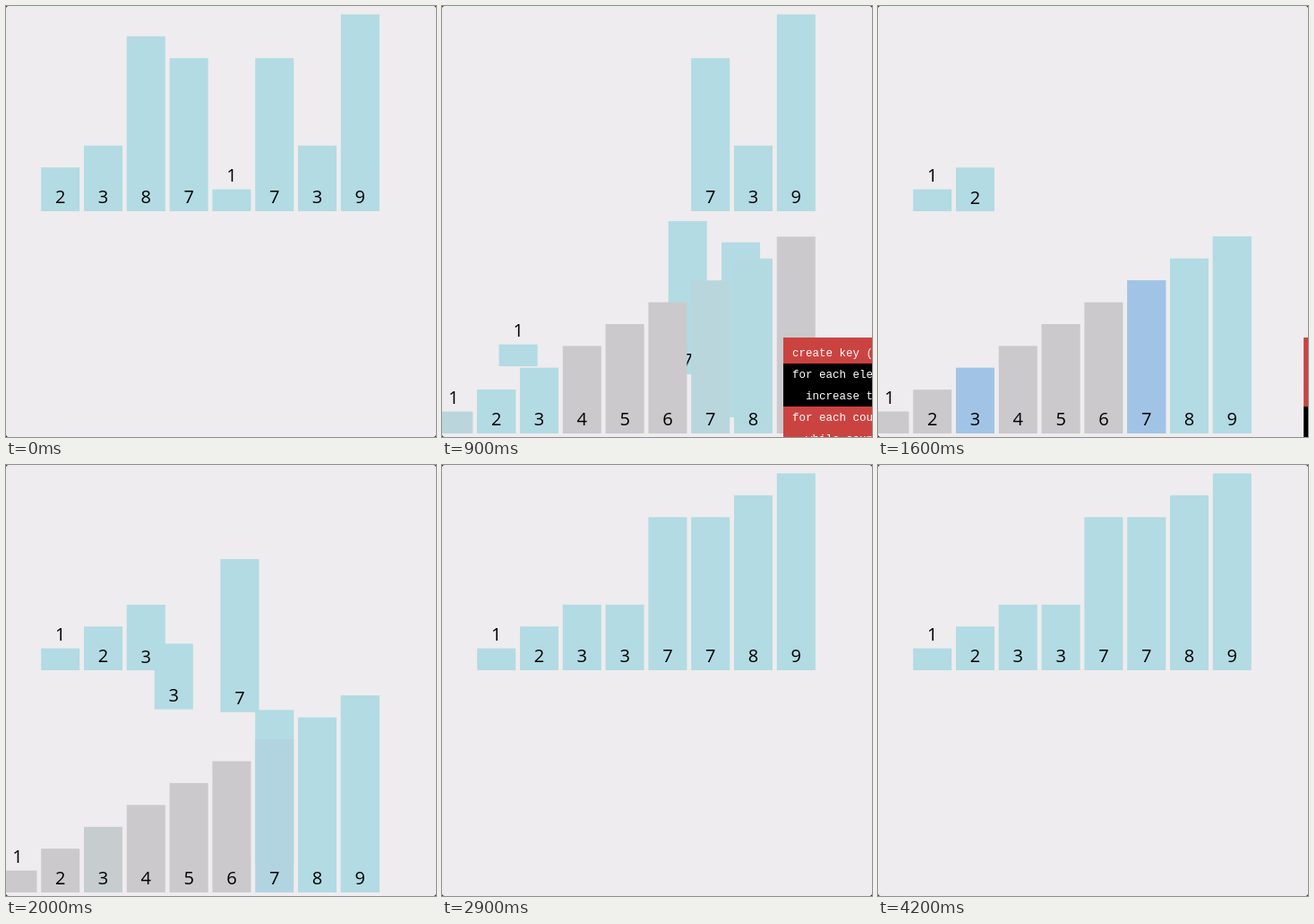
An HTML page for the animation above (4300 ms loop, 480x481 px).

```html
<!DOCTYPE html>
<html lang="en">
<head>
<meta charset="utf-8">
<title>Counting sort</title>
<style>
  html, body { margin: 0; width: 100%; height: 100%; overflow: hidden; background: #1c1c1c; }
  svg { display: block; width: 100%; height: 100%; }
  .digit { font: 20px "Open Sans", "Noto Sans", sans-serif; text-anchor: middle; }
  .code { font: 12.5px "Liberation Mono", "Courier New", monospace; fill: #fff; white-space: pre; }
  .status { font: 11px "Open Sans", sans-serif; fill: #fff; }
</style>
</head>
<body>
<svg id="stage" viewBox="0 0 480 481">
  <rect width="480" height="481" rx="3" fill="#eeecee"/>
  <g id="bars"></g>
  <g id="keys"></g>
  <g id="status">
    <rect y="316" width="300" height="51.5" fill="#f2852d"/>
    <text class="status" x="10" y="338">Increase the counter of each key</text>
  </g>
  <g id="code"></g>
</svg>
<script>
const LOOP = 4300, STEP = 100;
const PITCH = 47.8, WIDTH = 43, UNIT = 24.4, TOP_BASE = 229, KEY_BASE = 477;
const EMPTY = [203, 201, 203], ONE = [178, 219, 227], TWO = [161, 196, 230];
const PANEL_X = 381, RED = '#cb4340';
const values = [2, 3, 8, 7, 1, 7, 3, 9];
const lines = ['create key (counting) array', 'for each element in list',
  '  increase the counter', 'for each counter', '  while counter > 0'];

// Each step retargets every bar, which then eases on from wherever it is.
// 0 idle, 1 keys appear, 2-9 count an element, 10-17 restore one, 18 keys leave.
const starts = [0, 40, 190, 352, 575, 705, 773, 905, 984, 1151,
  1237, 1420, 1600, 1772, 1821, 1939, 2070, 2196, 2343];
const FIRST_COUNT = 2, FIRST_RESTORE = 10, LAST = 18;
const length = k => (k >= 4 && k <= 6 ? 220 : 190);

const order = values.map((v, i) => i).sort((a, b) => values[a] - values[b] || a - b);
const $ = id => document.getElementById(id);
const clamp = x => Math.max(0, Math.min(1, x));
const cubic = x => (x < 0.5 ? 4 * x ** 3 : 1 - 4 * (1 - x) ** 3);
const swing = x => 0.5 - Math.cos(Math.PI * clamp(x)) / 2;

function add(parent, tag, attrs, text) {
  const node = document.createElementNS('http://www.w3.org/2000/svg', tag);
  for (const name in attrs) node.setAttribute(name, attrs[name]);
  if (text) node.textContent = text;
  parent.appendChild(node);
  return node;
}

function makeBar(parent, value) {
  const group = add(parent, 'g', {});
  const height = value * UNIT;
  const rect = add(group, 'rect', { width: WIDTH, height, fill: `rgb(${ONE})` });
  add(group, 'text', { class: 'digit', x: WIDTH / 2, y: value > 1 ? height - 8.6 : -8.6 }, value);
  return { group, rect, value };
}

const slotX = i => 39.2 + PITCH * i;
const keyX = value => slotX(value - 2);
const place = (bar, x, y) =>
  bar.group.setAttribute('transform', `translate(${x.toFixed(2)} ${y.toFixed(2)})`);

// Follows a list of numbers through all steps begun by time t.
function follow(t, target) {
  let now = target(0);
  for (let k = 1; k <= LAST && starts[k] < t; k++) {
    const end = k < LAST ? Math.min(t, starts[k + 1]) : t;
    const p = cubic(clamp((end - starts[k]) / length(k)));
    const goal = target(k);
    now = now.map((v, i) => v + (goal[i] - v) * p);
  }
  return now;
}

function barTarget(i, k) {
  const v = values[i], rank = order.indexOf(i);
  if (k >= FIRST_RESTORE + rank) return [slotX(rank), TOP_BASE - v * UNIT];
  if (k >= FIRST_COUNT + i) return [keyX(v), KEY_BASE - v * UNIT];
  return [slotX(i), TOP_BASE - v * UNIT];
}

function keyTarget(value, k) {
  let count = 0;
  values.forEach((v, i) => {
    const inside = k >= FIRST_COUNT + i && k < FIRST_RESTORE + order.indexOf(i);
    if (v === value && inside) count++;
  });
  return [...[EMPTY, ONE, TWO][count], k ? value * UNIT : 0];
}

const bars = values.map(v => makeBar($('bars'), v));
const keys = [1, 2, 3, 4, 5, 6, 7, 8, 9].map(v => makeBar($('keys'), v));
keys.forEach(key => place(key, keyX(key.value), KEY_BASE - key.value * UNIT));

const rows = lines.map((line, i) => {
  const y = i ? 375 + 24 * i : 370;
  const rect = add($('code'), 'rect', { y, width: 300, height: i ? 24.5 : 29.5 });
  add($('code'), 'text', { class: 'code', x: 10, y: 391 + 24 * i }, line);
  return rect;
});

function slide(id, t, inAt, outAt, outTime) {
  const away = 1 - swing((t - inAt) / 280) + swing((t - outAt) / outTime);
  $(id).setAttribute('transform', `translate(${PANEL_X + 100 * away} 0)`);
}

function draw(t) {
  const step = starts.filter(s => s <= t).length - 1;
  bars.forEach((bar, i) => place(bar, ...follow(t, k => barTarget(i, k))));
  $('keys').setAttribute('visibility', step > 0 && step < LAST ? 'visible' : 'hidden');
  keys.forEach(key => {
    const [r, g, b, h] = follow(t, k => keyTarget(key.value, k));
    key.rect.setAttribute('fill', `rgb(${[r, g, b].map(Math.round)})`);
    key.rect.setAttribute('height', h);
  });
  const [from, to] = step < FIRST_COUNT ? [0, 0] : step < FIRST_RESTORE ? [1, 2] : [3, 4];
  rows.forEach((row, i) => row.setAttribute('fill', i >= from && i <= to ? '#000' : RED));
  slide('status', t, 60, 480, 280);
  slide('code', t, 60, 1237, 430);
}

let begin;
function tick(now) {
  begin ??= now;
  const t = (now - begin) % LOOP;
  draw(Math.floor(t / STEP) * STEP);
  requestAnimationFrame(tick);
}
draw(0);
requestAnimationFrame(tick);
</script>
</body>
</html>
```
